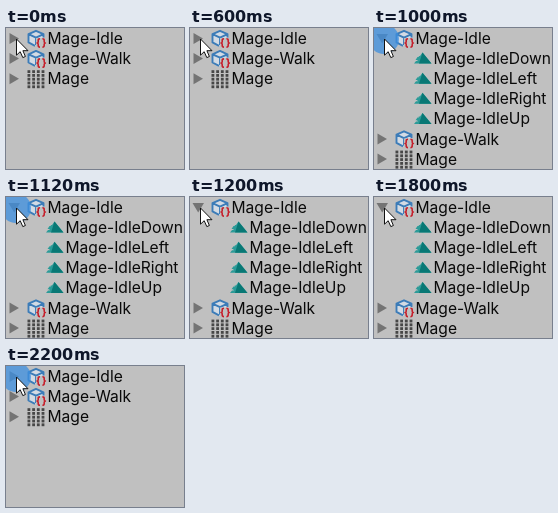
Animation, 178 px wide and 141 px high, one loop 2.4 s. Source, as an HTML page:

```html
<!DOCTYPE html>
<html lang="en">
<head>
<meta charset="utf-8">
<title>Asset tree</title>
<style>
  html, body { margin: 0; width: 100%; height: 100%; overflow: hidden; background: #c0c0c0; }
  svg { display: block; width: 178px; height: 141px; }
  text { font: 15.6px Inter, sans-serif; fill: #0a0a0a; }
  .fold { fill: #747474; }
</style>
</head>
<body>
<svg viewBox="0 0 178 141">
  <defs>
    <path id="closed" class="fold" d="M3.5 5L13 10.5L3.5 16Z"/>
    <path id="open" class="fold" d="M2.5 6H14L8.2 15.5Z"/>
    <g id="prefab" fill="none" stroke-linejoin="round">
      <path d="M30 2.8L37.5 6.2V14L30 18.3L22.5 14V6.2Z" fill="#d3dbe4"/>
      <path d="M29 17.8L22.5 14.4V6.2L30 2.8L37.5 6.2V9.5M22.5 6.2L30 9.6L37.5 6.2M30 9.6V17" stroke="#3c7cb8" stroke-width="1.9"/>
      <path d="M30 10H40V20H30Z" fill="#c0c0c0"/>
      <path d="M34 10.8Q32.2 10.8 32.2 12.4V13.7Q32.2 15 31 15Q32.2 15 32.2 16.3V17.6Q32.2 19.2 34 19.2M36.4 10.8Q38.2 10.8 38.2 12.4V13.7Q38.2 15 39.4 15Q38.2 15 38.2 16.3V17.6Q38.2 19.2 36.4 19.2" stroke="#c5202c" stroke-width="1.6"/>
    </g>
    <g id="clip">
      <path d="M48.5 4.5L57.5 15.5H40L42 13H44L43 11.8H41.5L43.5 9H45L44.6 8H46Z" fill="#2c9b98"/>
      <path d="M48.5 4.5L57.5 15.5H45Z" fill="#087875"/>
    </g>
    <g id="sheet"></g>
  </defs>
  <g id="collapsed"></g>
  <g id="expanded"></g>
  <circle id="press" cx="10" cy="11" r="15" fill="#3c8fe0" fill-opacity=".75"/>
  <path d="M10.5 11V27.2L14.2 23.7L16.8 29.6L19.4 28.5L16.9 22.7H22Z" fill="#fff" stroke="#111" stroke-width="1"/>
</svg>
<script>
  const PERIOD = 2400, ROW = 20.1;
  const byId = id => document.getElementById(id);
  const use = id => `<use href="#${id}"/>`;

  let sprites = '';
  for (let row = 0; row < 5; row++)
    for (let col = 0; col < 4; col++)
      sprites += `<rect x="${21.5 + col * 4.7}" y="${2 + row * 3.8}" width="2.8" height="2.8" fill="#474747"/>`;
  byId('sheet').innerHTML = sprites;

  const asset = (name, icon, fold = 'closed') => use(fold) + use(icon) + `<text x="41.5" y="16">${name}</text>`;
  const clip = name => use('clip') + `<text x="59.5" y="16">${name}</text>`;
  const list = rows => rows.map((row, i) => `<g transform="translate(0 ${i * ROW})">${row}</g>`).join('');

  const others = [asset('Mage-Walk', 'prefab'), asset('Mage', 'sheet')];
  byId('collapsed').innerHTML = list([asset('Mage-Idle', 'prefab'), ...others]);
  byId('expanded').innerHTML = list([
    asset('Mage-Idle', 'prefab', 'open'),
    ...['Down', 'Left', 'Right', 'Up'].map(way => clip('Mage-Idle' + way)),
    ...others
  ]);

  // Each step is [start time in ms, visible].
  function toggle(id, steps) {
    const frames = steps.map(([time, on]) => ({ offset: time / PERIOD, opacity: on, easing: 'step-end' }));
    frames.push({ offset: 1, opacity: steps.at(-1)[1] });
    byId(id).animate(frames, { duration: PERIOD, iterations: Infinity });
  }
  toggle('collapsed', [[0, 1], [1000, 0], [2200, 1]]);
  toggle('expanded', [[0, 0], [1000, 1], [2200, 0]]);
  toggle('press', [[0, 0], [1000, 1], [1200, 0], [2200, 1]]);
</script>
</body>
</html>
```
